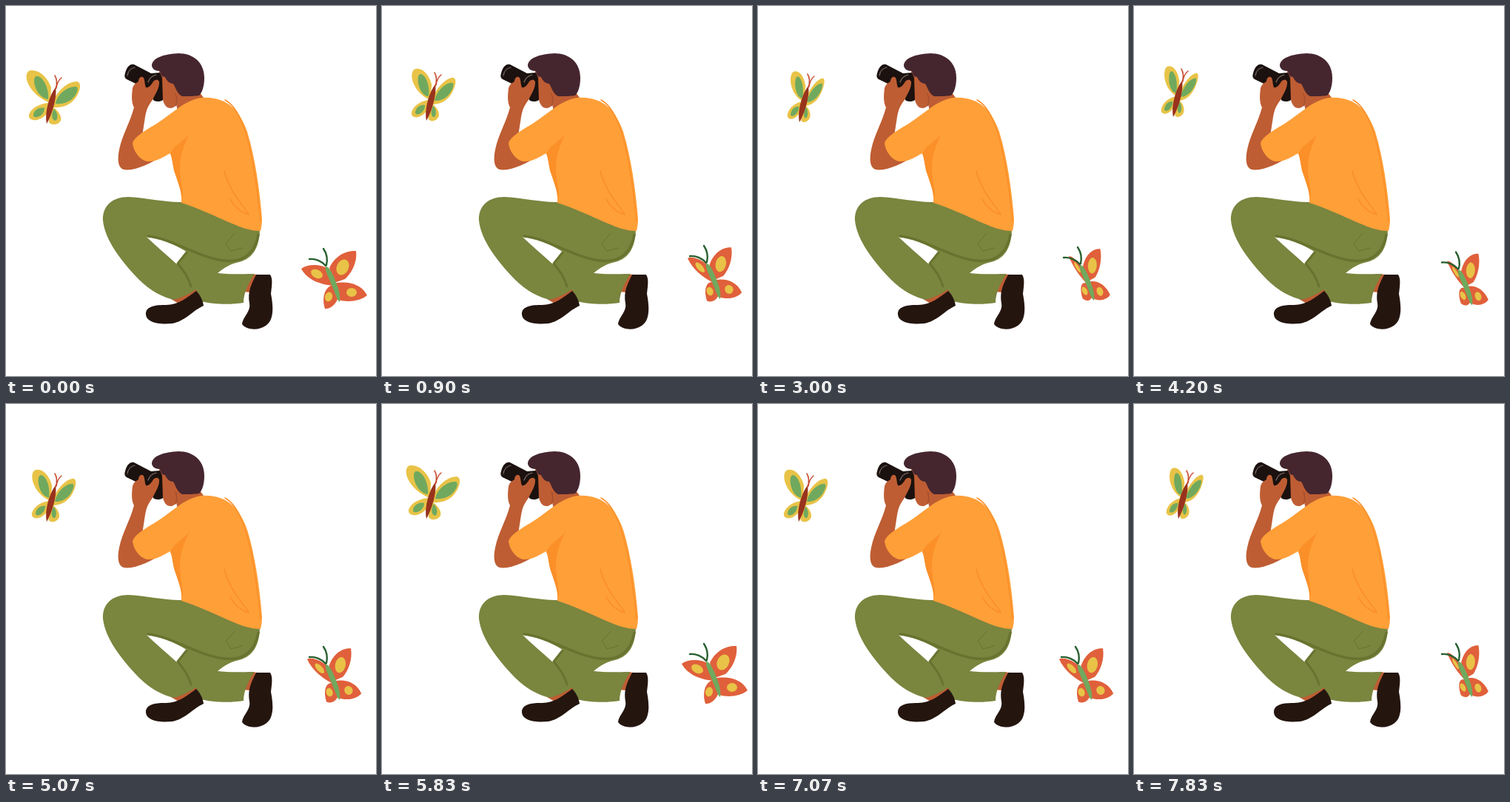
Write an HTML page that moves like this. It is 500 px wide and 500 px high and loops after 7.91 s.

```html
<!DOCTYPE html>
<html lang="en">
<head>
<meta charset="utf-8">
<title>Photographer and butterflies</title>
<style>
html, body { margin: 0; width: 100%; height: 100%; overflow: hidden; background: #fff; }
svg { display: block; width: 100vw; height: 100vh; }
.line { fill: none; stroke-linecap: round; stroke-linejoin: round; }
.shirt { fill: #ff9f38; } .shade { fill: #fb8f28; } .pants { fill: #7a853e; }
.skin { fill: #be5d33; } .dark { fill: #a5502e; } .shoe { fill: #24150f; }
.yellow { fill: #e8c347; } .leaf { fill: #70a95e; } .red { fill: #e0603b; }
</style>
</head>
<body>
<svg viewBox="0 0 500 500">
  <g id="man">
    <path class="skin" d="M207 88 C208 99 210 108 210 118 C212 128 214 138 222 138 C226 138 228 136 230 133 L232 142 L270 128 L262 117 L240 85Z"/>
    <path fill="#45262f" d="M197 80 C198 70 213 65 233 64 C254 64 268 77 268 97 C268 109 265 117 261 121 C254 122 245 122 238 122 C231 118 230 112 226 105 C221 105 217 101 215 96 C211 96 209 93 208 88 C202 88 197 85 197 80Z"/>
    <path class="line" stroke="#a5502e" stroke-width="1.5" d="M229 119 C231 124 232 129 229 135"/>
    <path fill="#1b110e" d="M161 91 C163 83 167 78 173 79 L196 91 L208 90 L211 97 L212 127 C208 130 203 129 200 128 L186 110 L163 99 C160 97 160 94 161 91Z"/>
    <path class="line" stroke="#776d68" stroke-width="1.2" d="M164 94 C165 88 169 84 174 83 M192 103 C194 97 198 94 203 93"/>
    <path class="skin" d="M171 111 C173 105 176 104 179 102 C179 97 183 94 186 97 C188 101 187 106 189 110 C193 111 196 107 199 102 C203 98 208 100 207 105 C206 114 201 120 198 127 C192 135 190 139 188 150 L184 176 L210 204 C195 212 174 224 159 221 C150 218 151 204 153 194 C157 174 168 157 173 137 C169 130 170 119 171 111Z"/>
    <path class="skin" d="M223 396 L256 381 L264 392 L240 406Z M326 362 L341 363 L330 387 L320 386Z"/>
    <path class="pants" fill-rule="evenodd" d="M238 265 C218 266 190 259 165 258 C144 258 130 270 131 290 C134 317 156 345 180 370 C194 384 212 394 227 397 C238 394 248 389 257 383 L263 399 C278 403 303 404 321 401 C321 388 328 373 336 362 C319 362 302 363 286 361 C294 354 304 348 315 346 C335 341 343 324 343 300Z M190 312 C207 313 227 322 244 332 L231 349 C217 336 202 324 190 312Z"/>
    <g class="line" stroke="#67742f">
      <path stroke-width="3.5" d="M192 311 C224 314 257 339 294 344 C320 347 336 336 341 309"/>
      <path stroke-width="3" d="M232 348 C240 358 247 367 250 379 M232 348 L244 333"/>
      <path stroke-width="1" d="M309 307 L297 321 L304 331 L319 327"/>
    </g>
    <path class="shirt" d="M171 185 C174 176 190 167 205 158 C223 147 240 128 263 124 C298 121 316 141 326 170 C337 206 343 250 346 288 C346 294 345 300 344 304 C318 305 284 281 237 266 C238 251 232 235 228 225 C225 214 225 206 222 199 C212 204 204 211 190 210 C180 207 172 196 171 185Z"/>
    <path class="shade" d="M248 173 C240 183 227 187 222 200 C225 204 225 218 229 228 C232 238 237 250 239 262 C240 248 235 236 235 220 C235 203 240 188 248 173Z"/>
    <path class="line" stroke="#fb8f28" stroke-width="1.6" d="M295 223 C301 247 315 264 328 281 M303 261 C309 272 318 279 328 282 M296 127 C315 137 325 170 332 204 C338 237 341 260 344 290"/>
    <path class="shoe" d="M189 416 C189 407 199 404 214 404 C232 405 245 394 257 385 C262 390 266 397 267 405 C253 411 242 426 225 429 C205 431 189 427 189 416Z"/>
    <path class="shoe" d="M338 363 L357 363 C361 369 359 379 358 389 C361 405 363 424 351 432 C341 439 325 438 319 430 C320 420 331 413 329 402 C326 386 332 375 338 363Z"/>
  </g>

  <g id="left">
    <g data-fold=".38"><path class="yellow" d="M60 131 C48 127 34 116 29 103 C26 94 28 87 34 87 C46 86 57 98 61 110 Z"/>
      <path class="leaf" d="M57 126 C46 125 38 111 38 101 C38 94 42 93 47 97 C54 103 58 115 57 126Z"/></g>
    <g data-fold=".38"><path class="yellow" d="M62 133 C67 117 82 102 96 102 C102 104 101 112 96 121 C89 134 76 138 62 137Z"/>
      <path class="leaf" d="M67 132 C68 121 82 108 95 109 C100 112 93 124 86 128 C79 132 73 133 67 132Z"/></g>
    <g data-fold=".3" data-skew="4"><path class="yellow" d="M60 131 C48 131 34 137 31 147 C30 153 36 155 42 154 C49 152 56 147 59 139Z"/>
      <path class="leaf" d="M52 138 C44 136 36 142 37 149 C42 153 52 147 52 138Z"/></g>
    <g data-fold=".3" data-skew="-4"><path class="yellow" d="M62 136 C70 140 76 149 74 155 C70 161 62 162 58 157 L57 146Z"/>
      <path class="leaf" d="M65 139 C70 144 71 152 67 155 C61 154 61 145 65 139Z"/></g>
    <path fill="#98331d" d="M67 110 C69 121 64 143 55 159 C52 147 57 123 67 110Z"/>
    <path class="line" stroke="#c8492e" stroke-width="1.5" d="M67 112 C69 106 69 99 66 94 M68 111 C69 104 71 100 75 97"/>
  </g>

  <g id="right">
    <g data-fold=".66" data-skew="34"><path class="red" d="M441 378 C424 376 407 370 399 355 C408 348 426 349 435 355Z"/>
      <ellipse class="yellow" cx="420" cy="362" rx="8.5" ry="5.5" transform="rotate(27 420 362)"/></g>
    <g data-fold=".28" data-skew="-9"><path class="red" d="M437 354 C443 340 457 330 473 331 C475 346 467 361 458 369 L444 374Z"/>
      <ellipse class="yellow" cx="455" cy="353" rx="8" ry="11" transform="rotate(25 455 353)"/></g>
    <g data-fold=".38" data-skew="-9"><path class="red" d="M443 375 C460 371 480 375 488 391 C479 399 461 401 449 397Z"/>
      <ellipse class="yellow" cx="467" cy="387" rx="7" ry="6"/></g>
    <g data-fold=".4" data-skew="36"><path class="red" d="M441 377 C429 381 427 397 431 409 C438 410 446 403 449 394Z"/>
      <ellipse class="yellow" cx="436" cy="393" rx="5" ry="6.5" transform="rotate(15 436 393)"/></g>
    <path class="leaf" d="M433 352 C438 353 444 367 448 379 C451 387 452 395 451 400 C448 399 444 386 440 377 C436 366 429 354 433 352Z"/>
    <path class="line" stroke="#28602f" stroke-width="2.4" d="M432 351 C427 345 418 341 410 342 M433 350 C435 342 433 334 429 328"/>
  </g>
</svg>
<script>
const LOOP = 7910, STEPS = 72, HALF = 36;
const starts = Array.from({ length: STEPS }, (_, k) => 10 * Math.round(Math.ceil(k * 33 / 10) * 10 / 3));
const folds = [0, 0.5, 1, 0.5];

// Tail positions around one circuit, with the tail and tilt of the drawn pose.
const flyers = [
  { id: "left", tail: [55, 159], tilt: 14.3,
    xs: [55, 54, 53, 54, 56, 59.5, 62, 60, 56],
    ys: [159, 155, 150, 147, 149, 151.5, 152.5, 155, 157] },
  { id: "right", tail: [450, 400], tilt: -19.5,
    xs: [450, 453, 456, 457, 457.5, 458, 458, 456, 453],
    ys: [400, 402.5, 404.5, 406, 403, 398, 394, 396, 398] }
];
for (const f of flyers) {
  f.node = document.getElementById(f.id);
  f.wings = [...f.node.querySelectorAll("[data-fold]")];
}

function pose(f, phase, fold) {
  const [x, y] = f.tail;
  f.node.setAttribute("transform", `translate(${f.xs[phase] - x} ${f.ys[phase] - y})`);
  for (const wing of f.wings) {
    const width = 1 - fold * wing.dataset.fold;
    const skew = fold * (wing.dataset.skew || 0);
    wing.setAttribute("transform",
      `translate(${x} ${y}) rotate(${f.tilt}) skewY(${skew}) scale(${width} 1) rotate(${-f.tilt}) translate(${-x} ${-y})`);
  }
}

let shown = -1;
function draw(now) {
  const t = now % LOOP;
  let k = STEPS - 1;
  while (starts[k] > t) k--;
  if (k !== shown) {
    shown = k;
    const m = k % HALF;
    const beat = m > 4 ? m - 1 : m; // one beat is held
    for (const f of flyers) pose(f, beat % 9, folds[beat % 4]);
  }
}

const begin = performance.now();
function tick() {
  draw(performance.now() - begin);
  requestAnimationFrame(tick);
}
tick();
</script>
</body>
</html>
```
